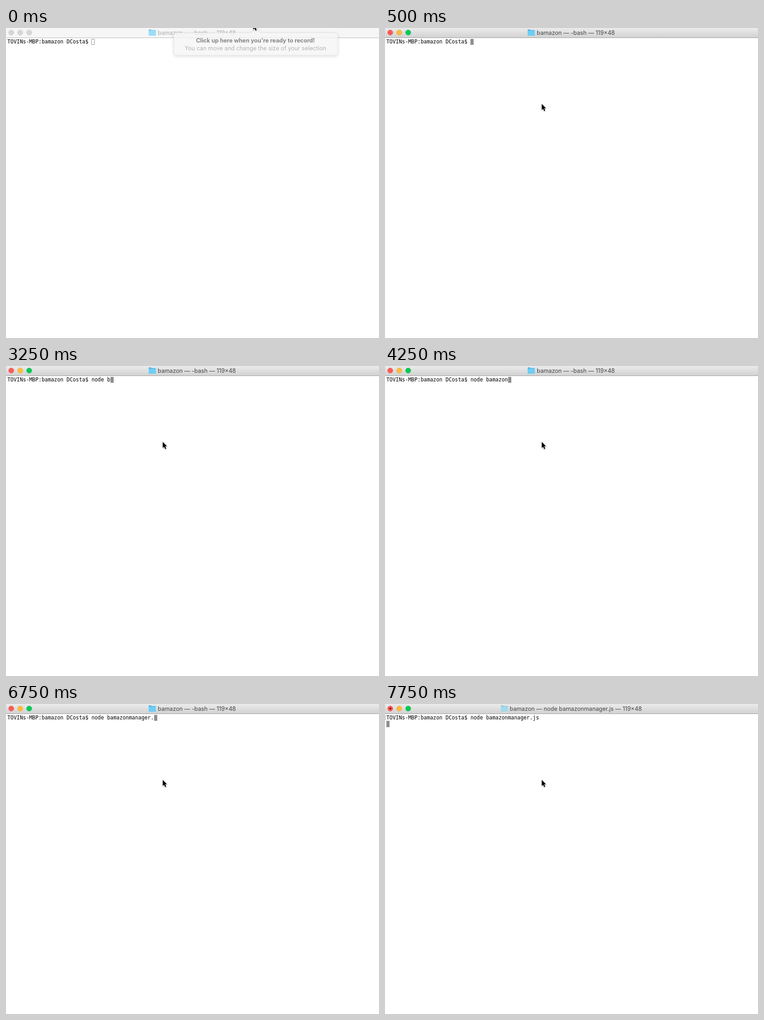
Recreate the animation shown at these times as an HTML page. Size 821 by 682 pixels, loop 8 s.

```html
<!DOCTYPE html>
<html lang="en">
<head>
<meta charset="utf-8">
<title>Terminal</title>
<style>
html, body { margin: 0; width: 100%; height: 100%; overflow: hidden; background: #fff; }
svg { display: block; }
text { font: 12.65px Inter, Roboto, sans-serif; text-anchor: middle; }
#line { font: 11.4px "DejaVu Sans Mono", monospace; text-anchor: start; white-space: pre; }
#title { fill: #434343; }
#bar { fill: url(#active); }
#edge { fill: #a0a0a0; }
#tab { fill: #50b7e6; }
#folder { fill: #6fcdf5; }
.idle #title { fill: #acacac; }
.idle #bar { fill: #f6f6f6; }
.idle #edge { fill: #b8b8b8; }
.idle #tab { fill: #80cde9; }
.idle #folder { fill: #9cdef7; }
.idle #lights circle { fill: #d6d6d6; stroke: #c3c3c3; }
.running #tab { fill: #8ccbdc; }
.running #folder { fill: #a3dbea; }
</style>
</head>
<body>
<svg id="stage" width="821" height="682" viewBox="0 0 821 682">
  <defs>
    <linearGradient id="active" x2="0" y2="1">
      <stop stop-color="#ebebeb"/><stop offset="1" stop-color="#d2d2d2"/>
    </linearGradient>
    <filter id="soft" x="-20%" y="-40%" width="140%" height="190%">
      <feDropShadow dx="0" dy="2" stdDeviation="3" flood-opacity=".16"/>
    </filter>
    <filter id="shade" x="-40%" y="-30%" width="190%" height="170%">
      <feDropShadow dx="0" dy="1" stdDeviation=".8" flood-opacity=".35"/>
    </filter>
  </defs>
  <rect id="bar" width="821" height="21"/>
  <rect id="edge" y="21" width="821" height="1"/>
  <g id="lights">
    <circle cx="11.5" cy="10" r="5.8" fill="#fc5b57" stroke="#e2514c" stroke-width=".6"/>
    <circle cx="31.3" cy="10" r="5.8" fill="#fdbb40" stroke="#e0a234" stroke-width=".6"/>
    <circle cx="51" cy="10" r="5.8" fill="#06c956" stroke="#08b34b" stroke-width=".6"/>
  </g>
  <circle id="dot" cx="11.7" cy="10" r="2" fill="#600"/>
  <g id="icon">
    <path id="tab" d="M0 15V4.2Q0 3 1.2 3H5L6.5 4.5H14.8Q16 4.5 16 5.7V15Z"/>
    <path id="folder" d="M0 6H16V15.8Q16 17 14.8 17H1.2Q0 17 0 15.8Z"/>
  </g>
  <text id="title" x="420" y="15"></text>
  <text id="line" x="3" y="34"></text>
  <path id="bracket" d="M2 26H.5V35H2" fill="none" stroke="#a0a0c4"/>
  <rect id="caret" stroke="#8f8f8f"/>
  <g id="hint">
    <path d="M375 10.5H540L550 .5L560 10.5H724Q730 10.5 730 16.5V54Q730 60 724 60H375.500Q369.500 60 369.500 54V16.500Q369.500 10.500 375 10.500Z"
      fill="#f9f9f9" fill-opacity=".78" stroke="#e2e2e2" filter="url(#soft)"/>
    <text x="549" y="32" fill="#858585" font-weight="700" style="font-weight:700">Click up here when you're ready to record!</text>
    <text x="549" y="49" fill="#b2b2b2">You can move and change the size of your selection</text>
  </g>
  <path id="mouse" d="M0 0V13.200L3 10.400L5.300 15.800L7.700 14.800L5.400 9.500H9.400Z" fill="#000"
    stroke="#fff" stroke-width="1.200" paint-order="stroke" filter="url(#shade)"/>
</svg>
<script>
const LOOP = 8000, CELL = 6.865;
const PROMPT = "TOVINs-MBP:bamazon DCosta$ ";
const COMMAND = "node bamazonmanager.js";
// [time in ms, characters typed]
const KEYS = [[0, 0], [1750, 1], [2000, 3], [2250, 5], [3250, 6], [3500, 7], [3750, 9],
  [4000, 11], [4250, 12], [6000, 15], [6250, 17], [6500, 19], [6750, 20], [7250, 22]];
// [time in ms, pointer x, pointer y]
const MOVES = [[0, 544, -10], [250, 361, 141], [500, 345, 167]];

const $ = id => document.getElementById(id);
const at = (steps, t) => steps.findLast(s => s[0] <= t);
const show = (id, on) => $(id).setAttribute("visibility", on ? "visible" : "hidden");
const set = (id, attrs) => {
  for (const k in attrs) $(id).setAttribute(k, attrs[k]);
};

function draw(t) {
  const idle = t < 500, entered = t >= 7500, running = t >= 7750;
  const typed = at(KEYS, t)[1];
  const [, mx, my] = at(MOVES, t);

  set("stage", { class: idle ? "idle" : running ? "running" : "" });
  $("title").textContent = `bamazon — ${running ? "node bamazonmanager.js" : "-bash"} — 119×48`;
  set("icon", { transform: `translate(${running ? 255 : 314})` });
  $("line").textContent = PROMPT + COMMAND.slice(0, typed);

  const column = entered ? 0 : PROMPT.length + typed;
  set("caret", {
    x: Math.round(3 + column * CELL) + .5, y: entered ? 37.5 : 24.5,
    width: 6, height: entered ? 13 : 12, fill: idle ? "none" : "#8f8f8f"
  });
  show("bracket", entered);
  show("dot", running);
  show("hint", t < 250);
  set("mouse", { transform: `translate(${mx} ${my})` });
}

function tick() {
  draw(performance.now() % LOOP);
  requestAnimationFrame(tick);
}
tick();
</script>
</body>
</html>
```
